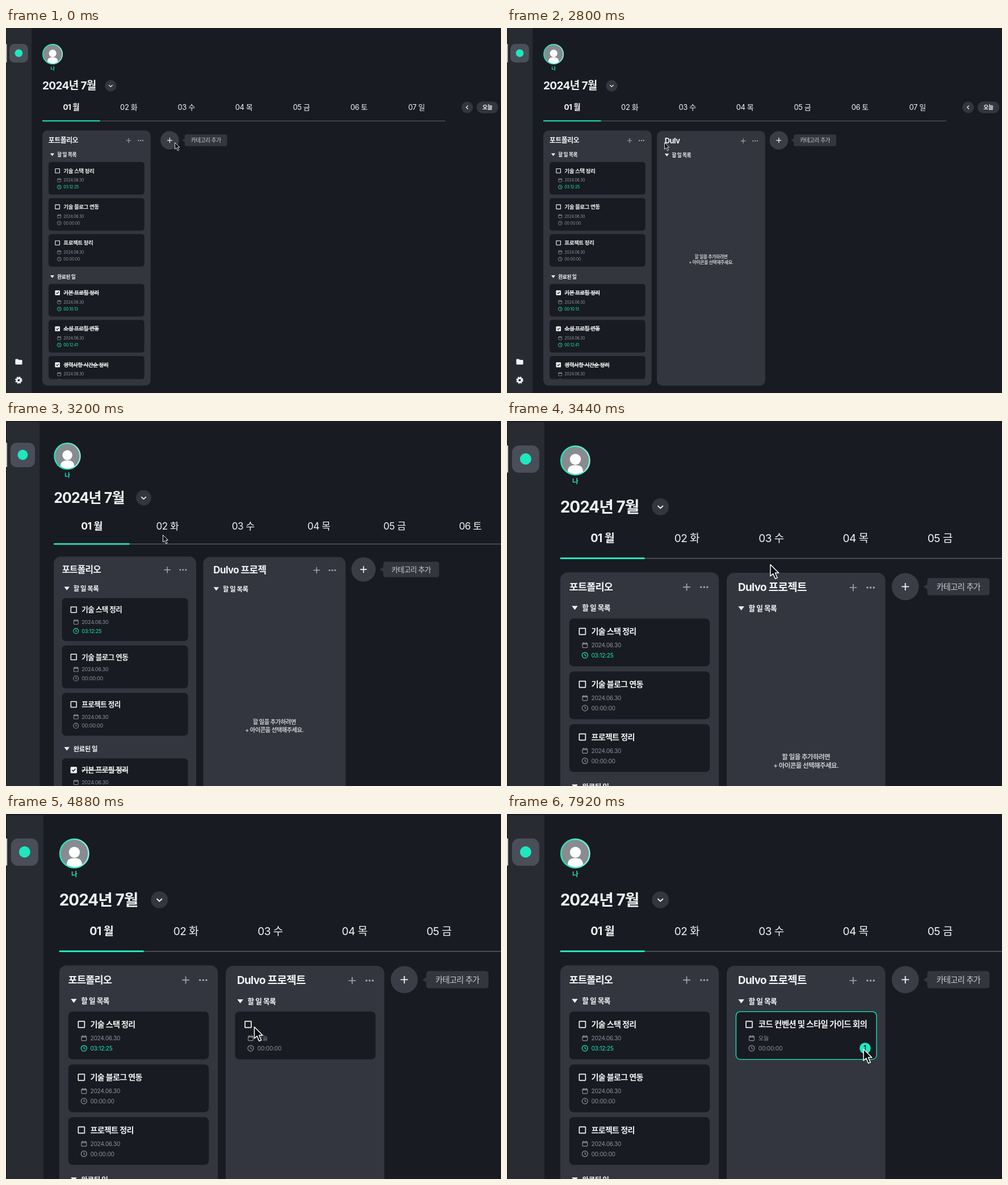
An HTML page for the animation above (8 s loop, 872x642 px).

```html
<!DOCTYPE html>
<html lang="ko">
<head>
<meta charset="utf-8">
<title>Task board</title>
<style>
  html, body { margin: 0; width: 100%; height: 100%; overflow: hidden; background: #181b21; }
  svg { display: block; width: 100%; height: 100%; }
  text { font-family: Inter, 'Noto Sans CJK KR', 'Noto Sans CJK', sans-serif; letter-spacing: -.05em; }
  .num { letter-spacing: -.03em; }
  .mid { text-anchor: middle; }
  .b { font-weight: 600; }
  .bb { font-weight: 700; }
  .done { text-decoration: line-through; }
</style>
</head>
<body>
<svg id="stage" viewBox="0 0 872 642" preserveAspectRatio="none"></svg>
<script>
(() => {
const LOOP = 8000;
const BG = '#181b21', PANEL = '#33363f', TEAL = '#1ee8bf', WHITE = '#f4f5f6', GREY = '#8f9298', SOFT = '#c9cbd0';

// Drawing helpers
const text = (x, y, size, str, fill = WHITE, cls = '', extra = '') =>
  `<text x="${x}" y="${y}" font-size="${size}" fill="${fill}" class="${cls}" ${extra}>${str}</text>`;
const rect = (x, y, w, h, r, fill, extra = '') =>
  `<rect x="${x}" y="${y}" width="${w}" height="${h}" rx="${r}" fill="${fill}" ${extra}/>`;
const circle = (x, y, r, fill, extra = '') =>
  `<circle cx="${x}" cy="${y}" r="${r}" fill="${fill}" ${extra}/>`;
const line = (d, color, w, extra = '') =>
  `<path d="${d}" fill="none" stroke="${color}" stroke-width="${w}" ${extra}/>`;
const plus = (x, y, r, color, w) => line(`M${x - r} ${y}h${2 * r}M${x} ${y - r}v${2 * r}`, color, w);
const group = (id, body) => `<g id="${id}">${body}</g>`;

const section = (x, y, label) =>
  `<path d="M${x} ${y - 2.5}h7.2l-3.6 4.8z" fill="${WHITE}"/>` + text(x + 12.4, y + 3.1, 8.7, label, WHITE, 'b');

const columnTools = (x, y) => plus(x + 152, y, 4.3, '#a6a9ae', 1.1) +
  [-3.8, 0, 3.8].map(d => circle(x + 173 + d, y, 1.15, '#a6a9ae')).join('');

const calendar = (x, y) =>
  rect(x - 3, y - 2.5, 6, 5.4, .8, 'none', `stroke="${GREY}" stroke-width=".8"`) +
  line(`M${x - 3} ${y - 1.4}h6M${x - 1.6} ${y - 3.5}v1.4M${x + 1.6} ${y - 3.5}v1.4`, GREY, .9);

const clock = (x, y, color) =>
  circle(x, y, 3.4, 'none', `stroke="${color}" stroke-width=".85"`) + line(`M${x} ${y - 2}v2.1l1.5 .9`, color, .8);

function checkbox(x, y, done) {
  if (!done) return rect(x, y, 7.5, 7.5, .4, 'none', `stroke="${WHITE}" stroke-width="1.15"`);
  return rect(x - .5, y - .5, 8.6, 8.6, 1.2, WHITE) + line(`M${x + 1.6} ${y + 3.7}l1.7 1.8 2.9-3.4`, BG, 1.2);
}

function card(x, y, title, time, opt = {}) {
  const color = time === '00:00:00' ? GREY : TEAL;
  const tx = x + 26.4 + (opt.shift || 0);
  return rect(x, y, 168.9, 57.3, 5, BG, opt.id ? `id="${opt.id}Box" stroke-width=".9"` : '') +
    checkbox(x + 12, y + 11.7, opt.done) +
    text(tx, y + 18.8, opt.size || 9.6, title, WHITE, opt.done ? 'b done' : 'b', opt.id ? `id="${opt.id}Text"` : '') +
    calendar(x + 18.8, y + 32) +
    text(tx, y + 34.5, 7, opt.date || '2024.06.30', GREY, 'num') +
    clock(x + 18.8, y + 44, color) +
    text(tx, y + 46.6, 7, time, color, 'num');
}

// Static parts
function sidebar() {
  return rect(0, 0, 45, 660, 0, '#282b32') + rect(0, 0, .7, 660, 0, '#15171b') +
    rect(0, 28, 1.4, 32.5, 0, '#d0d2d5') + rect(6, 28, 32.8, 32.8, 8.5, '#4a4e58') +
    circle(22.4, 44.2, 6.8, TEAL) +
    `<path d="M16.4 583.6q0-1.4 1.4-1.4h3.2l1.5 1.5h4.6q1.4 0 1.4 1.4v5.6q0 1.4-1.4 1.4h-9.3q-1.4 0-1.4-1.4z" fill="${WHITE}"/>` +
    circle(22.4, 619.5, 3.5, 'none', `stroke="${WHITE}" stroke-width="2.8"`) +
    circle(22.4, 619.5, 5.4, 'none', `stroke="${WHITE}" stroke-width="1.8" stroke-dasharray="2.5 1.74"`);
}

function weekBar() {
  const days = [...'월화수목금토일'].map((d, i) =>
    text((114.8 + i * 101.4).toFixed(1), 144.2, i ? 13 : 13.4, `0${i + 1} ${d}`, WHITE, 'num mid' + (i ? '' : ' bb'))).join('');
  return circle(82.1, 46, 17.2, '#888b90', 'stroke="url(#ring)" stroke-width="1.7"') +
    circle(82.2, 44.6, 6.6, '#fff') +
    '<path d="M73 59.6C73 54 76 51.6 82.2 51.6S91.4 54 91.4 59.6Q87 62.4 82.2 62.4T73 59.6z" fill="#fff"/>' +
    text(82, 74, 8, '나', TEAL, 'mid b') +
    text(64, 108.4, 19, '2024년 7월', WHITE, 'bb', 'style="letter-spacing:-.034em"') +
    circle(184.4, 101.6, 10.2, PANEL) + line('M181.2 100.3l3.2 3.1 3.2-3.1', WHITE, 1.3) +
    days + rect(64, 163, 710, 1, 0, '#5d6066') + rect(64, 162.4, 101.5, 2, 0, TEAL) +
    circle(812.5, 139.6, 10.2, PANEL) + line('M813.9 136.4l-3.1 3.2 3.1 3.2', WHITE, 1.3) +
    rect(829, 129.2, 38.3, 20.8, 10.4, PANEL) + text(848, 143.3, 10, '오늘', WHITE, 'mid b');
}

function firstColumn() {
  const todo = [['기술 스택 정리', '03:12:25'], ['기술 블로그 연동', '00:00:00'], ['프로젝트 정리', '00:00:00']];
  const done = [['기본 프로필 정리', '00:10:13'], ['소셜 프로필 연동', '00:12:41'], ['경력사항 시간순 정리', '00:00:00']];
  return rect(64, 180.3, 190.7, 448.5, 9, PANEL) + text(74.8, 202.3, 12, '포트폴리오', WHITE, 'b') +
    columnTools(64, 198) + section(77.9, 223, '할 일 목록') + section(77.9, 437.4, '완료된 일') +
    todo.map(([t, s], i) => card(74.9, 235.8 + i * 63.35, t, s)).join('') +
    `<g clip-path="url(#list)">${done.map(([t, s], i) => card(74.9, 450.2 + i * 63.35, t, s, { done: true })).join('')}</g>`;
}

function secondColumn() {
  return rect(264.1, 180.9, 190.7, 448, 9, PANEL) +
    text(277.7, 202.6, 12.9, '', WHITE, 'bb', 'id="title" style="letter-spacing:-.035em"') +
    columnTools(264.1, 198.6) + section(278, 223.6, '할 일 목록') +
    group('hint', text(359.4, 404.5, 7.85, '할 일을 추가하려면', SOFT, 'mid b') +
      text(359.4, 414.9, 7.85, '+ 아이콘을 선택해주세요.', SOFT, 'mid b')) +
    group('task', card(275.3, 235.8, '', '00:00:00', { id: 'task', date: '오늘', size: 9.9, shift: .5 }) +
      group('play', circle(430.5, 279.8, 6.7, TEAL) + line('M429 277.6l1.8-1.2v7', BG, 1)));
}

const addButton = circle(288.4, 197.5, 16.3, '#3a3d46') + plus(288.4, 197.5, 4.4, WHITE, 1.25) +
  `<path d="M310 197.5l5.4-3.4v6.8z" fill="${PANEL}"/>` + rect(314.8, 187.2, 74.8, 20.6, 3, PANEL) +
  text(352.2, 201, 9.7, '카테고리 추가', SOFT, 'mid');

document.getElementById('stage').innerHTML =
  `<defs><linearGradient id="ring"><stop offset=".3" stop-color="${TEAL}"/><stop offset="1" stop-color="#8df3e4"/></linearGradient>
   <clipPath id="list">${rect(74.9, 444, 168.9, 173.6, 5, '#000')}</clipPath></defs>` +
  rect(0, 0, 872, 642, 0, BG) +
  group('board', sidebar() + weekBar() + firstColumn() + group('column', secondColumn()) + group('add', addButton)) +
  group('cursor', '<path d="M0 0V11.6L2.7 9.2 4.9 14.2 7 13.3 4.8 8.4H8.4Z" fill="#0b0c0e" stroke="#fff" stroke-width=".85" stroke-linejoin="round"/>');

// Typing: every keystroke gives one state, Hangul syllables are composed step by step
const INITIALS = 'ㄱㄲㄴㄷㄸㄹㅁㅂㅃㅅㅆㅇㅈㅉㅊㅋㅌㅍㅎ';
function keystrokes(str) {
  const states = [''];
  let done = '';
  for (const ch of str) {
    const n = ch.charCodeAt(0) - 0xac00;
    if (n >= 0 && n < 11172) {
      states.push(done + INITIALS[Math.floor(n / 588)]);
      if (n % 28) states.push(done + String.fromCharCode(0xac00 + n - n % 28));
    }
    done += ch;
    states.push(done);
  }
  return states;
}
const typed = (states, t, from, step) =>
  states[Math.max(0, Math.min(states.length - 1, Math.floor((t - from) / step)))];

const titleKeys = keystrokes('Dulvo 프로젝트');
const taskKeys = keystrokes('코드 컨벤션 및 스타일 가이드 회의');

// Cursor stops: time, x, y, scale
const stops = [
  [0, 297.5, 201.5, 1], [1880, 297.5, 201.5, 1], [2400, 277.5, 201.5, 1], [2800, 277.5, 201.5, 1],
  [3200, 276.5, 200.5, 1.08], [3440, 464, 252.5, 1.75], [3600, 464, 252.5, 1.75], [4160, 608, 292, 1.75],
  [4460, 608, 292, 1.75], [4800, 437.5, 374.5, 1.75], [6980, 437.5, 374.5, 1.75], [7600, 628, 413.5, 1.75],
  [LOOP, 628, 413.5, 1.75]
];
const ease = (t, a, b) => {
  const u = Math.max(0, Math.min(1, (t - a) / (b - a)));
  return u * u * (3 - 2 * u);
};
function cursorAt(t) {
  const i = stops.findIndex(s => s[0] > t);
  const a = stops[i - 1], b = stops[i], u = ease(t, a[0], b[0]);
  return a.map((v, k) => v + (b[k] - v) * u);
}

const el = id => document.getElementById(id);
const move = (id, x, y, k = 1) => el(id).setAttribute('transform', `translate(${x} ${y}) scale(${k})`);
const show = (id, on) => el(id).setAttribute('display', on ? 'inline' : 'none');

function draw(t) {
  const zoom = ease(t, 2810, 3440);
  const hasColumn = t >= 980, hasTask = t >= 4470, hover = t >= 7020;
  move('board', 0, 2 * zoom, 1 + .4655 * zoom);
  show('column', hasColumn);
  move('add', hasColumn ? 190.4 : 0, 0);
  show('hint', !hasTask);
  show('task', hasTask);
  show('play', hover);
  el('taskBox').setAttribute('stroke', hover ? TEAL : 'none');
  el('title').textContent = typed(titleKeys, t, 2615, 44);
  el('taskText').textContent = typed(taskKeys, t, 5790, 25.6);
  const [, x, y, k] = cursorAt(t);
  move('cursor', x, y, k);
}

const begin = performance.now();
function tick() {
  draw(Math.max(0, performance.now() - begin) % LOOP);
  requestAnimationFrame(tick);
}
tick();
})();
</script>
</body>
</html>
```
